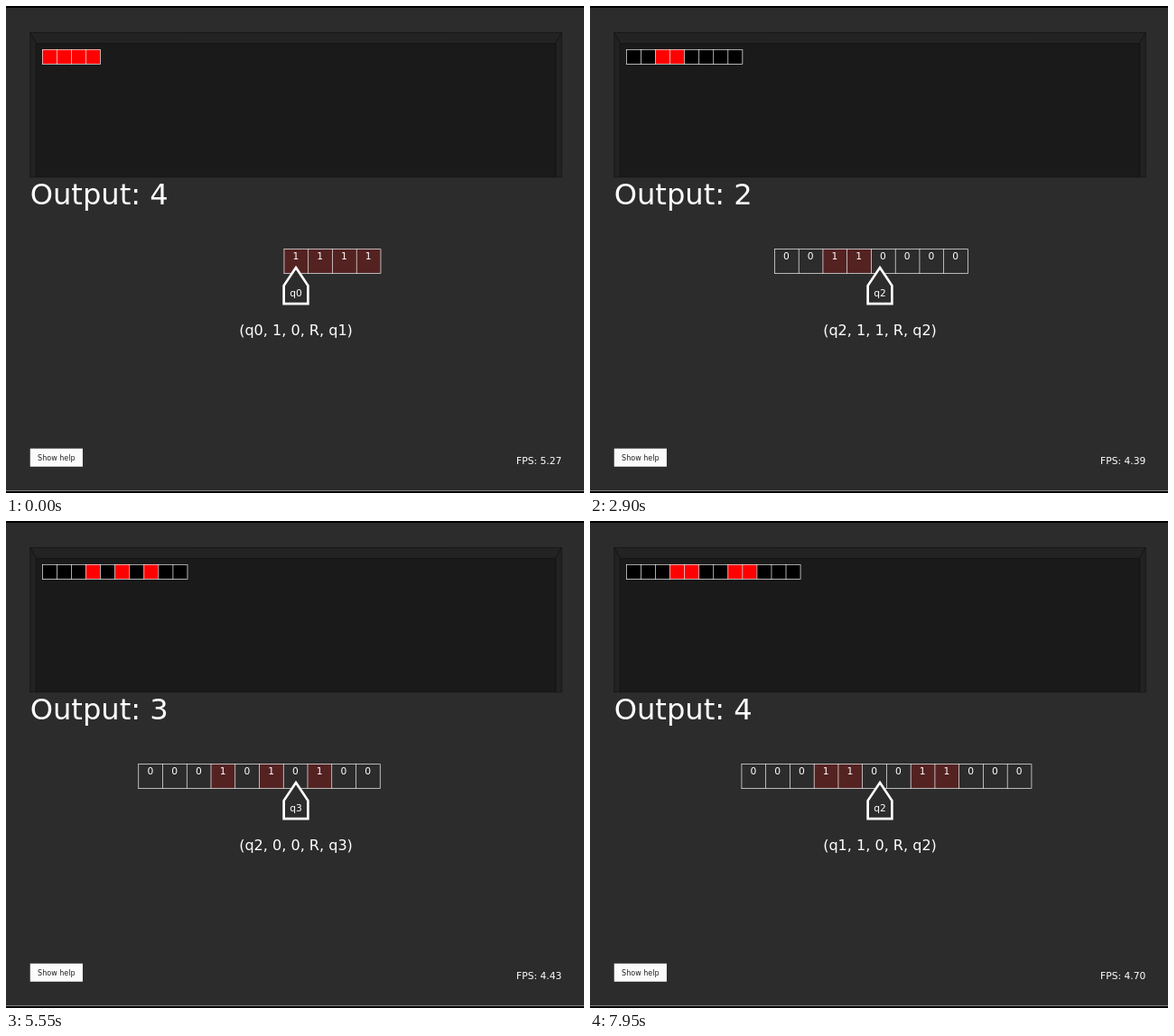
Write an HTML page with a canvas that moves like this. It is 640x540 px and loops after 8000 ms.

```html
<!DOCTYPE html>
<html lang="en">
<head>
<meta charset="utf-8">
<title>Turing machine</title>
<style>
html, body { margin: 0; width: 100%; height: 100%; overflow: hidden; background: #2c2c2c; }
canvas { display: block; }
</style>
</head>
<body>
<canvas id="stage" width="640" height="540"></canvas>
<script>
const ctx = document.getElementById('stage').getContext('2d');
const TICK = 50, LOOP = 8000;
const BG = '#2c2c2c', WHITE = '#fff', EDGE = '#121212';

// The scene is a 960 x 800 window shown at reduced size below a thin border.
const SCALE = 0.66875, BORDER = 2.5;
const CENTER = 480, CELL = 40, MARGIN = 40;

// state, symbol read, symbol written, direction, next state
const RULES = [
  'q0, 1, 0, R, q1',
  'q1, 1, 0, R, q2',
  'q2, 0, 0, R, q3', 'q2, 1, 1, R, q2',
  'q3, 0, 1, L, q4', 'q3, 1, 1, R, q3',
  'q4, 0, 0, L, q5', 'q4, 1, 1, L, q4',
  'q5, 0, 1, R, q1', 'q5, 1, 1, L, q5'
];

// Pace of the run: [tick, steps done]
const PACE = [[39.5, 0], [58, 3.87], [80, 7.99], [127, 14.11], [136, 15.06], [159, 19.235]];

function stepsDone(tick) {
  if (tick <= PACE[0][0]) return 0;
  const i = PACE.findIndex(key => key[0] >= tick);
  const [t0, s0] = PACE[i - 1], [t1, s1] = PACE[i];
  return s0 + (s1 - s0) * (tick - t0) / (t1 - t0);
}

function frameRate(tick) {
  return 4.55 + 0.72 * Math.exp(-tick / 120) * Math.cos(2 * Math.PI * tick / 84);
}

function findRule(state, symbol) {
  return RULES.find(rule => rule.startsWith(`${state}, ${symbol},`));
}

function simulate(count) {
  let tape = [1, 1, 1, 1], head = 0, state = 'q0';
  const steps = [{ tape: [...tape], from: 0, to: 0, state, rule: findRule(state, 1) }];
  while (steps.length <= count) {
    const rule = findRule(state, tape[head]);
    const [, , write, dir, next] = rule.split(', ');
    tape[head] = Number(write);
    let from = head;
    head += dir === 'R' ? 1 : -1;
    if (dir === 'R' && head >= tape.length - 2) tape.push(0, 0);
    if (dir === 'L' && head < 2) {
      tape.unshift(0, 0);
      from += 2;
      head += 2;
    }
    state = next;
    steps.push({ tape: [...tape], from, to: head, state, rule });
  }
  return steps;
}
const steps = simulate(20);

function rect(x, y, w, h, color) {
  ctx.fillStyle = color;
  ctx.fillRect(x, y, w, h);
}

function text(str, x, y, size, align = 'center', color = WHITE) {
  ctx.font = `${size}px "DejaVu Sans", sans-serif`;
  ctx.textAlign = align;
  ctx.fillStyle = color;
  ctx.fillText(str, x, y);
}

function polygon(points, fill, stroke, width) {
  ctx.beginPath();
  points.forEach(([x, y]) => ctx.lineTo(x, y));
  ctx.closePath();
  ctx.fillStyle = fill;
  ctx.fill();
  ctx.strokeStyle = stroke;
  ctx.lineWidth = width;
  ctx.stroke();
}

function drawCells(tape, left, top, size, colors) {
  const width = tape.length * size;
  rect(left, top, width, size, colors[0]);
  tape.forEach((bit, i) => bit && rect(left + i * size, top, size, size, colors[1]));
  for (let x = 0; x <= width; x += size) rect(left + x, top, 1, size + 1, WHITE);
  rect(left, top, width, 1, WHITE);
  rect(left, top + size, width, 1, WHITE);
}

function drawPanel() {
  const left = MARGIN, right = 2 * CENTER - MARGIN, top = 40.5, bottom = 280;
  const inL = left + 10, inR = right - 10, inT = top + 18;
  polygon([[left, top], [right, top], [inR, inT], [inL, inT]], '#232323', EDGE, 1);
  polygon([[left, top], [inL, inT], [inL, bottom], [left, bottom]], '#222', EDGE, 1);
  polygon([[right, top], [inR, inT], [inR, bottom], [right, bottom]], '#222', EDGE, 1);
  polygon([[inL, inT], [inR, inT], [inR, bottom], [inL, bottom]], '#1a1a1a', EDGE, 1);
}

function drawFrame() {
  rect(0, 0, 640, 540, BG);
  rect(0, 0, 640, 2, '#000');
  rect(0, 537, 640, 1, '#858585');
  rect(0, 538, 640, 2, '#000');
}

function drawHead(state) {
  const l = CENTER - 20, r = CENTER + 20;
  polygon([[CENTER, 430], [r, 460], [r, 490], [l, 490], [l, 460]], BG, WHITE, 4);
  text(state, CENTER, 478, 16);
}

function draw(tick) {
  const done = stepsDone(tick);
  const { tape, from, to, state, rule } = steps[done > 0 ? Math.floor(done) + 1 : 0];
  const position = from + (to - from) * (done % 1);
  const left = CENTER - (position + 0.5) * CELL;

  ctx.setTransform(1, 0, 0, 1, 0, 0);
  drawFrame();
  ctx.setTransform(SCALE, 0, 0, SCALE, 0, BORDER);

  drawPanel();
  drawCells(tape, 60, 68, 24, ['#000', '#f00']);
  text('Output: ' + tape.reduce((a, b) => a + b), MARGIN, 325, 48, 'left');

  drawCells(tape, left, 399, CELL, [BG, '#522']);
  tape.forEach((bit, i) => text(bit, left + (i + 0.5) * CELL, 416.5, 16));
  drawHead(state);
  text(`(${rule})`, CENTER, 542, 24);

  rect(MARGIN, 730, 87, 30, '#fbfbfb');
  text('Show help', MARGIN + 43.5, 750.5, 12, 'center', '#222');
  text('FPS: ' + frameRate(tick).toFixed(2), 2 * CENTER - MARGIN, 755.5, 16, 'right');
}

function play() {
  draw(Math.floor(performance.now() % LOOP / TICK));
  requestAnimationFrame(play);
}
play();
</script>
</body>
</html>
```
